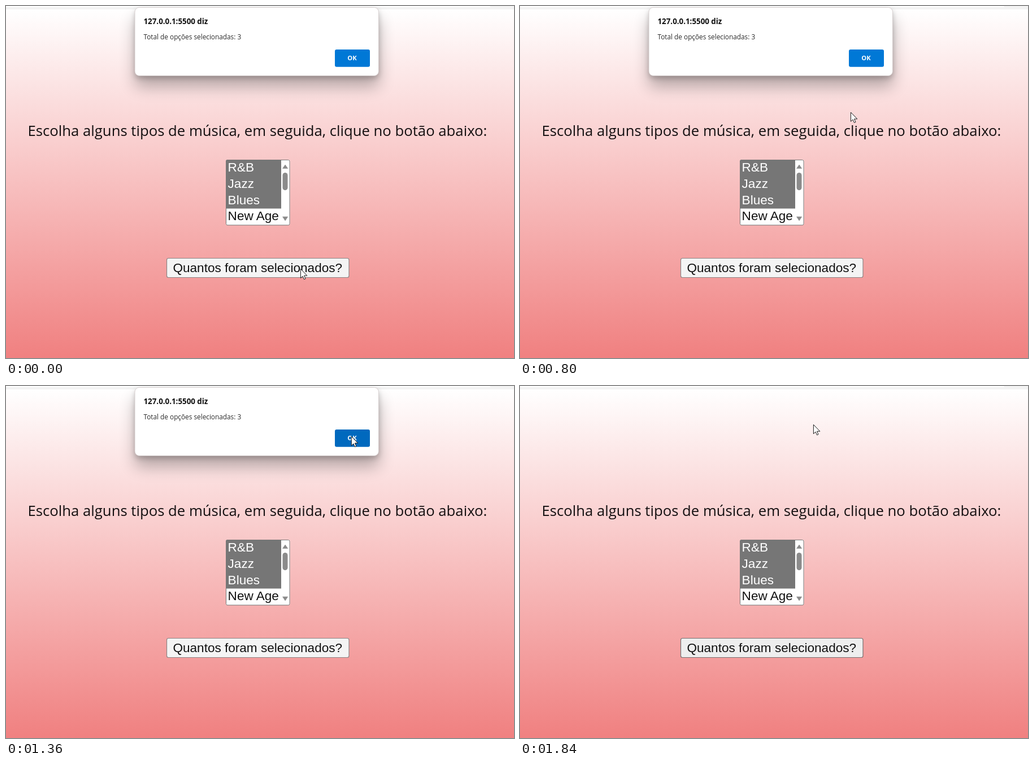
Write an HTML page that moves like this. It is 899 by 623 pixels and loops after 1.92 s.

```html
<!DOCTYPE html>
<html lang="pt-BR">
<head>
<meta charset="utf-8">
<title>Tipos de música</title>
<style>
  html, body { margin: 0; width: 100%; height: 100%; overflow: hidden; background: #fff; }
  svg { display: block; width: 899px; height: 623px; }
  text { white-space: pre; }
  .ui { font-family: "Open Sans", "Noto Sans", sans-serif; }
  .control { font: 22.55px "Liberation Sans", Arial, sans-serif; fill: #111; }
  .selected { fill: #fff; }
  .strong { font-weight: 700; }
</style>
</head>
<body>
<svg viewBox="0 0 899 623">
  <defs>
    <linearGradient id="page" x1="0" y1="0" x2="0" y2="1">
      <stop offset="0" stop-color="#fff"/>
      <stop offset="1" stop-color="#f08080"/>
    </linearGradient>
    <filter id="soft" x="-20%" y="-60%" width="140%" height="220%"><feGaussianBlur stdDeviation="14"/></filter>
    <filter id="tight" x="-20%" y="-60%" width="140%" height="220%"><feGaussianBlur stdDeviation="5"/></filter>
    <clipPath id="listClip"><rect x="389" y="272" width="113.5" height="116" rx="3"/></clipPath>
  </defs>

  <rect y="5" width="899" height="618" fill="url(#page)"/>
  <rect width="899" height="6" fill="#f3f3f3"/>
  <rect width="857" height="2" rx="1" fill="#fff"/>

  <text class="ui" x="38.5" y="230" font-size="25.7" fill="#141011">Escolha alguns tipos de música, em seguida, clique no botão abaixo:</text>

  <g clip-path="url(#listClip)">
    <rect x="389" y="272" width="114" height="116" fill="#fff"/>
    <rect x="389" y="272" width="98" height="86.5" fill="#767676"/>
    <g id="options"></g>
    <rect x="489.5" y="295" width="9" height="31" rx="4.5" fill="#8b8b8b"/>
    <path d="M489.5 287.5l4.6-6.5 4.6 6.5zM489.5 373l4.6 7 4.6-7z" fill="#8b8b8b" stroke="#8b8b8b" stroke-width=".6" stroke-linejoin="round"/>
  </g>
  <rect x="389.5" y="272.5" width="112.5" height="115.3" rx="2.5" fill="none" stroke="#767676"/>

  <rect id="count" x="284.5" y="446.5" width="322.5" height="34" rx="3" stroke-width="1.2"/>
  <text class="control" x="295.5" y="471">Quantos foram selecionados?</text>

  <g id="dialog">
    <rect x="228" y="21" width="432" height="122" rx="8" opacity=".27" filter="url(#soft)"/>
    <rect x="228" y="7" width="432" height="121" rx="8" opacity=".2" filter="url(#tight)"/>
    <rect x="228" y="2.5" width="431.5" height="121" rx="8" fill="#fff" stroke="#cfc6c6" stroke-width=".8"/>
    <text class="ui strong" x="243.5" y="32" font-size="13.35" fill="#111">127.0.0.1:5500 diz</text>
    <text class="ui" x="243.5" y="58.7" font-size="11.8" fill="#2b2b2b">Total de opções selecionadas: 3</text>
    <rect id="ok" x="582" y="77" width="62" height="30.7" rx="3"/>
    <text class="ui strong" x="612.5" y="96" font-size="11.2" text-anchor="middle" fill="#fff">OK</text>
  </g>

  <path id="cursor" d="M.4.4V16.6L4 13.2 6.5 18.8 9 17.7 6.5 12.2H11.8Z" fill="#fff" stroke="#1b1b1b" stroke-linejoin="round"/>
</svg>
<script>
  const LOOP = 1920, STEP = 80;
  const PRESS = 1440, CLOSE = 1600, LEAVE = 1760;
  const $ = id => document.getElementById(id);

  // Pointer tip: time, x, y
  const path = [
    [0, 521, 465], [160, 523, 457], [640, 572, 259], [960, 596, 126],
    [1200, 609, 94], [1520, 611, 88], [1600, 611, 88], [1840, 519, 68]
  ];

  ["R&B", "Jazz", "Blues", "New Age"].forEach((name, i) => {
    const label = document.createElementNS("http://www.w3.org/2000/svg", "text");
    label.setAttribute("class", i < 3 ? "control selected" : "control");
    label.setAttribute("x", 392.6);
    label.setAttribute("y", 293.3 + i * 28.6);
    label.textContent = name;
    $("options").append(label);
  });

  function slope(i, axis) {
    const a = path[Math.max(i - 1, 0)], b = path[Math.min(i + 1, path.length - 1)];
    return (b[axis] - a[axis]) / (b[0] - a[0]);
  }

  // Cubic Hermite curve through the pointer positions
  function pointer(t, axis) {
    let i = 0;
    while (i < path.length - 2 && path[i + 1][0] <= t) i++;
    const a = path[i], b = path[i + 1], span = b[0] - a[0];
    const u = (t - a[0]) / span, v = 1 - u;
    return a[axis] * v * v * (1 + 2 * u) + b[axis] * u * u * (1 + 2 * v)
      + span * u * v * (slope(i, axis) * v - slope(i + 1, axis) * u);
  }

  function paint(id, fill, stroke = "none") {
    $(id).setAttribute("fill", fill);
    $(id).setAttribute("stroke", stroke);
  }

  function render(time) {
    const t = Math.floor(time % LOOP / STEP) * STEP;
    const x = pointer(t, 1), y = pointer(t, 2);
    $("cursor").setAttribute("transform", `translate(${x} ${y})`);
    $("dialog").setAttribute("visibility", t < CLOSE ? "visible" : "hidden");
    paint("ok", t >= PRESS ? "#005ca8" : y < 107 ? "#0069be" : "#0078d6");
    if (t < CLOSE) paint("count", "#f4f4f4", "#8d8585");
    else if (t < LEAVE) paint("count", "#e4e4e4", "#504c4c");
    else paint("count", "#eeeeee", "#767070");
  }

  const start = performance.now();
  function tick() {
    render(performance.now() - start);
    requestAnimationFrame(tick);
  }
  tick();
</script>
</body>
</html>
```
